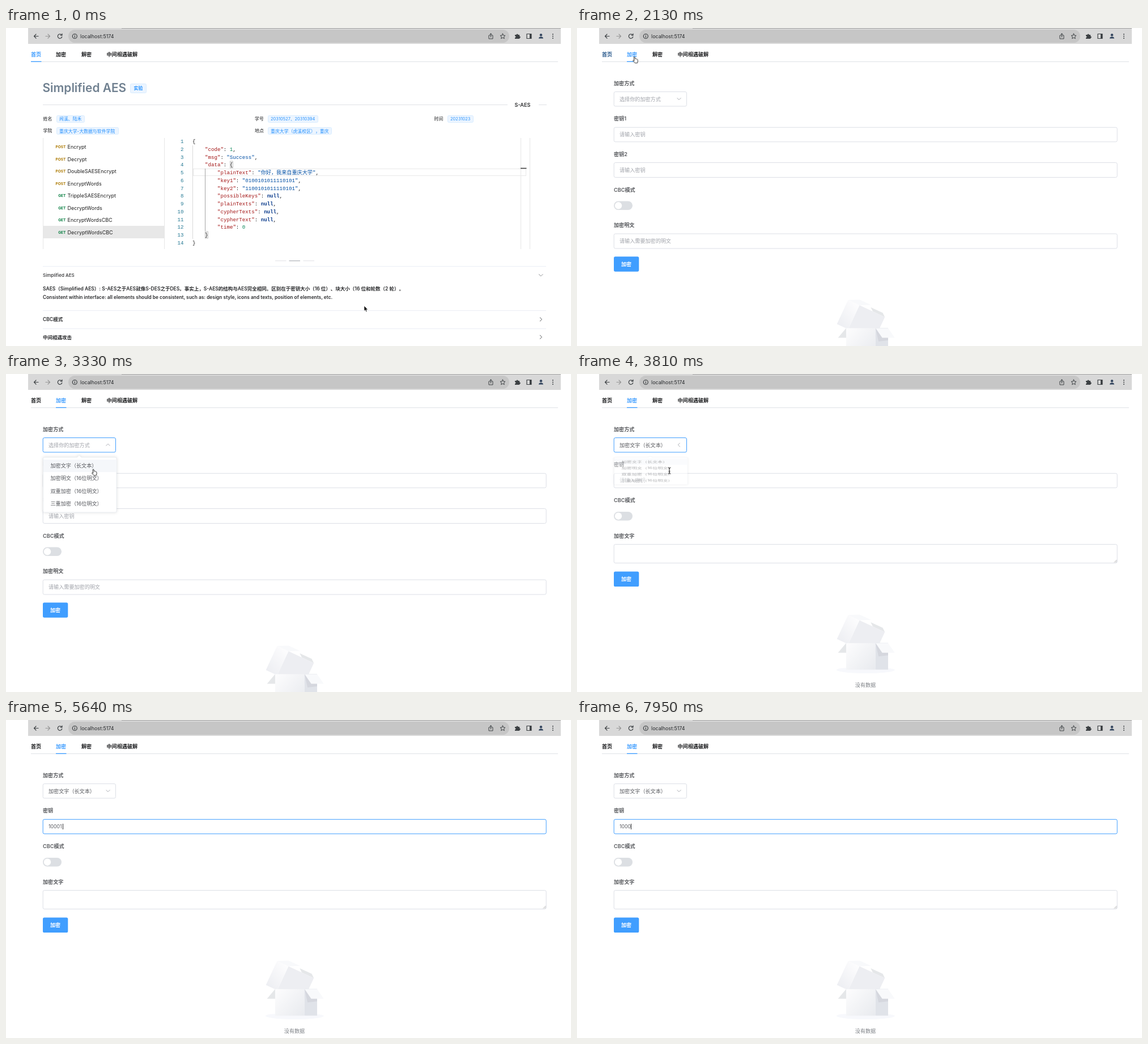
Recreate the animation shown at these times as an HTML page. Size 997 by 561 pixels, loop 8 s.

```html
<!DOCTYPE html>
<html lang="zh-CN">
<head>
<meta charset="utf-8">
<title>S-AES</title>
<style>
html, body { margin: 0; width: 100%; height: 100%; overflow: hidden; background: #fff; }
svg { display: block; width: 997px; height: 561px; text-spacing-trim: space-all; }
/* y of each text is the middle of its capitals */
text { font: 9.1px Inter, "Noto Sans CJK SC", "Noto Sans CJK", sans-serif; fill: #303133; transform: translateY(.36em); }
.nav text, .label, .mid, .bold { font-weight: 600; }
.nav text { fill: #1c1d1f; }
.label { fill: #56585c; }
.mid { font-size: 8.5px; fill: #2a2b2d; }
.small { font-size: 7.9px; fill: #1c1d1f; }
.tag { font-size: 7.9px; fill: #2390ff; }
.num { font-size: 7.5px; }
.tags rect { fill: #ecf5ff; stroke: #d9ecff; }
.api text { font-size: 9px; fill: #212121; }
.verb text { font-size: 6.6px; font-weight: 700; text-anchor: end; }
.post { fill: #ad7a03; }
.get { fill: #0a7f42; }
.code { font: 9.13px "Liberation Mono", "Noto Sans CJK SC", "Noto Sans CJK", monospace; transform: translateY(.33em); fill: #222; }
.key { fill: #a31515; }
.str { fill: #0451a5; }
.int { fill: #098658; }
.nul { fill: #0b3c8c; font-weight: 700; }
.hint { fill: #a0a3aa; }
.value { fill: #55575c; }
.digits { font-size: 8.7px; }
.field { fill: #fff; stroke: #dcdfe6; }
.thin { fill: none; stroke-linecap: round; stroke-linejoin: round; }

/* one loop lasts 8 s, 1% = 80 ms */
.step { animation: 8s step-end infinite; }
.flow { animation: 8s linear infinite; }
.home { animation-name: home; }
.form { animation-name: form; }
.first { animation-name: first; }
.second { animation-name: second; }
.nav .home-link { animation-name: home-link; }
.nav .form-link { animation-name: form-link; }
.menu { animation-name: menu; transform-origin: 129px 147px; }
.hover { animation-name: hover; }
.chevron { animation-name: chevron; transform-origin: 180px 125px; }
.select { animation-name: select; }
.input { animation-name: input; }
.ask { animation-name: ask; }
.one { animation-name: one; }
.four { animation-name: four; }
.five { animation-name: five; }
.caret { animation-name: caret; }
.cursor { animation-name: move; }
.arrow { animation-name: arrow; }
.hand { animation-name: hand; }
.beam { animation-name: beam; }

@keyframes home { 0% { opacity: 1 } 24.75%, to { opacity: 0 } }
@keyframes form { 0% { opacity: 0 } 24.75%, to { opacity: 1 } }
@keyframes first { 0% { opacity: 1 } 45.75%, to { opacity: 0 } }
@keyframes second { 0% { opacity: 0 } 45.75%, to { opacity: 1 } }
@keyframes home-link { 0%, 24.75% { fill: #409eff } 28.5%, to { fill: #1c1d1f } }
@keyframes form-link { 0%, 20.25% { fill: #1c1d1f } 23.5%, to { fill: #409eff } }
@keyframes menu {
  0%, 35.59% { opacity: 0; transform: scaleY(.43) }
  35.6% { opacity: .7; transform: scaleY(.43); animation-timing-function: ease-out }
  38.5%, 45.75% { opacity: 1; transform: none }
  49.5%, to { opacity: 0; transform: scaleY(0) }
}
@keyframes hover { 0% { opacity: 0 } 39.5%, to { opacity: 1 } }
@keyframes chevron {
  0%, 35.2% { transform: rotate(0) }
  38.8%, 45.75% { transform: rotate(180deg) }
  49.5%, to { transform: rotate(0) }
}
@keyframes select {
  0%, 35.59% { stroke: #dcdfe6 }
  35.6%, 51.25% { stroke: #409eff }
  57%, to { stroke: #dcdfe6 }
}
@keyframes input { 0%, 50.5% { stroke: #dcdfe6 } 53%, to { stroke: #409eff } }
@keyframes ask { 0% { opacity: 1 } 69.75%, to { opacity: 0 } }
@keyframes one { 0% { opacity: 0 } 69.75% { opacity: 1 } 70.125%, to { opacity: 0 } }
@keyframes four { 0% { opacity: 0 } 70.125% { opacity: 1 } 70.5% { opacity: 0 } 87.375%, to { opacity: 1 } }
@keyframes five { 0% { opacity: 0 } 70.5% { opacity: 1 } 87.375%, to { opacity: 0 } }
@keyframes caret {
  0% { opacity: 0; transform: none }
  50.5% { opacity: 1; transform: none }
  56.25% { opacity: 0; transform: none }
  67.8% { opacity: 1; transform: none }
  69.75% { opacity: 1; transform: translateX(4px) }
  70.125% { opacity: 1; transform: translateX(20px) }
  70.5% { opacity: 1; transform: translateX(25px) }
  76.1% { opacity: 0; transform: translateX(25px) }
  82.1% { opacity: 1; transform: translateX(25px) }
  87.375% { opacity: 1; transform: translateX(20px) }
  93.3% { opacity: 0; transform: translateX(20px) }
  99.3%, to { opacity: 1; transform: translateX(20px) }
}
@keyframes move {
  0%, 9.7% { transform: translate(632px, 490px) }
  10.5% { transform: translate(631.5px, 489.5px) }
  14.2% { transform: translate(631.5px, 489.5px); animation-timing-function: cubic-bezier(.35, .2, .4, 1) }
  19.1% { transform: translate(108px, 62px) }
  20.6% { transform: translate(100px, 52px) }
  23.6%, 25% { transform: translate(97px, 46px); animation-timing-function: ease-in-out }
  34.1%, 35.7% { transform: translate(147px, 116px); animation-timing-function: ease-in-out }
  41.2% { transform: translate(153px, 168px) }
  45.75% { transform: translate(154px, 166px); animation-timing-function: ease-in-out }
  52%, to { transform: translate(201.5px, 190px) }
}
@keyframes arrow { 0% { opacity: 1 } 20.3% { opacity: 0 } 28.2% { opacity: 1 } 33.3%, to { opacity: 0 } }
@keyframes hand { 0% { opacity: 0 } 20.3% { opacity: 1 } 28.2% { opacity: 0 } 33.3% { opacity: 1 } 47.6%, to { opacity: 0 } }
@keyframes beam { 0% { opacity: 0 } 47.6% { opacity: 1 } 69.75%, to { opacity: 0 } }
</style>
</head>
<body>
<svg viewBox="0 0 997 561" xmlns="http://www.w3.org/2000/svg">
<defs>
  <linearGradient id="lid" x1=".3885" y1="0" x2=".6115" y2="1">
    <stop stop-color="#fcfcfd"/><stop offset="1" stop-color="#eeeff3"/>
  </linearGradient>
  <linearGradient id="front" x1="0" y1=".095" x2="1" y2=".905">
    <stop stop-color="#fcfcfd"/><stop offset="1" stop-color="#e9ebef"/>
  </linearGradient>
  <filter id="shadow" x="-20%" y="-20%" width="140%" height="140%">
    <feDropShadow dx="0" dy="0" stdDeviation="2.5" flood-opacity=".14"/>
  </filter>
  <g id="toggle">
    <rect x="65" y="-7.7" width="33" height="15.4" rx="7.7" fill="#dcdfe3"/>
    <circle cx="73" r="6.2" fill="#fff"/>
  </g>
  <g id="button">
    <rect x="65" width="44.3" height="26.4" rx="2.6" fill="#409eff"/>
    <text class="bold" x="78" y="13" style="fill:#fff">加密</text>
  </g>
  <g id="empty">
    <g transform="scale(1.3)">
      <path d="M39.5 86C61.3 86 79 83.9 79 81.3S57.3 78 35.5 78 0 78.8 0 81.3 17.7 86 39.5 86Z" fill="#f7f8fc"/>
      <path d="M13 45H53L42 58H2Z" fill="#e5e7e9"/>
      <g transform="translate(34.5 31.5) scale(-1 1) rotate(-25) translate(-27.5 -21.5)">
        <path d="M0 7H18L23 3H5Z" fill="#e5e7e9"/>
        <path d="M0 7H38V43H0Z" fill="#edeef2"/>
        <rect x="38" y="7" width="17" height="36" fill="url(#lid)"/>
        <path d="M55 7H38L24 0H41Z" fill="#f8f9fb"/>
      </g>
      <rect x="13" y="45" width="40" height="36" fill="url(#front)"/>
      <path d="M53 45H70V81H53Z" fill="#e0e3e9"/>
      <path d="M70 45H53L57 63 70 61.5Z" fill="#d5d7de"/>
      <path d="M70 45H53L62 58H79Z" fill="#f8f9fb"/>
    </g>
    <text x="51" y="132" text-anchor="middle" style="fill:#7d8086">没有数据</text>
  </g>
</defs>

<!-- browser bar -->
<rect x="39" width="940" height="28" fill="#d8d8d8"/>
<rect x="204" width="775" height="1" fill="#a5a5a5"/>
<rect x="110" y="3" width="778" height="23" rx="11.5" fill="#c6c6c6"/>
<g class="thin" stroke="#3c4043" stroke-width="1.2">
  <path d="M57 14.5H49.5M53 11l-3.5 3.5L53 18"/>
  <path d="M70 14.5H77.5M74 11l3.5 3.5L74 18" stroke="#979797"/>
  <path d="M98.3 12.5A3.8 3.8 0 1 0 98.8 15.5M99 10v3h-3"/>
  <circle cx="121.3" cy="14.5" r="4"/>
  <path d="M121.3 14.2v2.3M121.3 12.3v.1"/>
  <path d="M854 13h-2v6h7v-6h-2M855.5 16v-6M853.7 11.5l1.8-1.8 1.8 1.8" stroke-width="1"/>
  <path d="M876.5 10l1.3 3 3.2.3-2.4 2.2.7 3.2-2.8-1.7-2.8 1.7.7-3.2-2.4-2.2 3.2-.3Z" stroke-width="1"/>
  <rect x="919" y="10.5" width="8" height="8"/>
</g>
<g fill="#3c4043">
  <path d="M898 12h2.5a1.6 1.6 0 0 1 3.2 0h2.5v2.5a1.6 1.6 0 0 1 0 3.2v1.3h-8.2v-2a1.5 1.5 0 0 0 0-3Z"/>
  <path d="M924 10.5h3v8h-3Z"/>
  <circle cx="965" cy="11" r="1"/><circle cx="965" cy="14.5" r="1"/><circle cx="965" cy="18" r="1"/>
</g>
<g fill="#34465f"><circle cx="944" cy="12.2" r="2.2"/><path d="M940 18.5v-1q1-2.3 4-2.3t4 2.3v1Z"/></g>
<text x="131" y="14.5" style="font-size:8.9px;fill:#26282b">localhost:5174</text>

<g class="nav">
  <path d="M44 59.5H974" stroke="#dfe1e6"/>
  <path class="home step" d="M44 59.3H62.5" stroke="#409eff" stroke-width="1.4"/>
  <path class="form step" d="M88 59.3H106.5" stroke="#409eff" stroke-width="1.4"/>
  <text class="home-link flow" x="44" y="47">首页</text>
  <text class="form-link flow" x="88" y="47">加密</text>
  <text x="133" y="47">解密</text>
  <text x="177.5" y="47">中间相遇破解</text>
</g>

<!-- home page -->
<g class="home step">
  <text class="bold" x="64.5" y="105.5" style="font-size:20.9px;fill:#708090">Simplified AES</text>
  <path d="M65 135.5H885M940 135.5H954" stroke="#dfe1e6"/>
  <text class="bold" x="897.5" y="136">S-AES</text>
  <g class="tags">
    <rect x="219.5" y="98.5" width="28" height="16" rx="2"/>
    <rect x="89.5" y="154.5" width="49" height="12" rx="2"/>
    <rect x="89.5" y="175.5" width="109" height="12" rx="2"/>
    <rect x="462.5" y="154.5" width="88" height="12" rx="2"/>
    <rect x="462.5" y="175.5" width="112" height="12" rx="2"/>
    <rect x="779.5" y="154.5" width="45" height="12" rx="2"/>
  </g>
  <text class="tag bold" x="225.5" y="106.5">实验</text>
  <text class="small" x="65.5" y="160">姓名</text>
  <text class="small" x="65.5" y="181.5">学院</text>
  <text class="small" x="439" y="160">学号</text>
  <text class="small" x="439" y="181.5">地点</text>
  <text class="small" x="755.5" y="160">时间</text>
  <text class="tag" x="94" y="160.5">闻溪、陆禾</text>
  <text class="tag" x="94" y="182">重庆大学-大数据与软件学院</text>
  <text class="tag num" x="467" y="160.5">20310527、20310394</text>
  <text class="tag" x="467" y="182">重庆大学（虎溪校区），重庆</text>
  <text class="tag num" x="784" y="160.5">20231023</text>

  <rect x="65" y="349" width="214" height="22" fill="#e8e8e8"/>
  <path d="M65.5 194V390M279.5 194V390M908.5 194V390M924.5 194V390" stroke="#e6e6e6"/>
  <g class="verb">
    <text class="post" x="105.5" y="210">POST</text>
    <text class="post" x="105.5" y="231.5">POST</text>
    <text class="post" x="105.5" y="253">POST</text>
    <text class="post" x="105.5" y="274.5">POST</text>
    <text class="get" x="105.5" y="296">GET</text>
    <text class="get" x="105.5" y="317.5">GET</text>
    <text class="get" x="105.5" y="339">GET</text>
    <text class="get" x="105.5" y="360.5">GET</text>
  </g>
  <g class="api">
    <text x="108.5" y="210">Encrypt</text>
    <text x="108.5" y="231.5">Decrypt</text>
    <text x="108.5" y="253">DoubleSAESEncrypt</text>
    <text x="108.5" y="274.5">EncryptWords</text>
    <text x="108.5" y="296">TrippleSAESEncrypt</text>
    <text x="108.5" y="317.5">DecryptWords</text>
    <text x="108.5" y="339">EncryptWordsCBC</text>
    <text x="108.5" y="360.5">DecryptWordsCBC</text>
  </g>

  <rect x="330.5" y="248.5" width="587" height="12" fill="none" stroke="#e8e8e8"/>
  <path d="M329.5 207V372" stroke="#d9d9d9"/>
  <path d="M351.5 248V358" stroke="#a5a5a5"/>
  <path d="M908 247.5H918.5" stroke="#3c3c3c" stroke-width="1.5"/>
  <g fill="#f1f1f1" stroke="#b9b9b9" stroke-width=".8">
    <rect x="395.3" y="235" width="5" height="12"/><rect x="351.3" y="359" width="5" height="12"/>
  </g>
  <text class="code" y="200" text-anchor="end" style="fill:#237893">
    <tspan x="313.5">1</tspan><tspan x="313.5" dy="13.77">2</tspan><tspan x="313.5" dy="13.77">3</tspan><tspan x="313.5" dy="13.77">4</tspan><tspan x="313.5" dy="13.77">5</tspan><tspan x="313.5" dy="13.77">6</tspan><tspan x="313.5" dy="13.77">7</tspan><tspan x="313.5" dy="13.77">8</tspan><tspan x="313.5" dy="13.77">9</tspan><tspan x="313.5" dy="13.77">10</tspan><tspan x="313.5" dy="13.77">11</tspan><tspan x="313.5" dy="13.77">12</tspan><tspan x="313.5" dy="13.77">13</tspan><tspan x="313.5" dy="13.77">14</tspan>
  </text>
  <text class="code" y="200">
    <tspan x="329">{</tspan>
    <tspan x="351" dy="13.77" class="key">"code"</tspan>: <tspan class="int">1</tspan>,
    <tspan x="351" dy="13.77" class="key">"msg"</tspan>: <tspan class="str">"Success"</tspan>,
    <tspan x="351" dy="13.77" class="key">"data"</tspan>: {
    <tspan x="373" dy="13.77" class="key">"plainText"</tspan>: <tspan class="str">"你好，我来自重庆大学"</tspan>,
    <tspan x="373" dy="13.77" class="key">"key1"</tspan>: <tspan class="str">"0100101011110101"</tspan>,
    <tspan x="373" dy="13.77" class="key">"key2"</tspan>: <tspan class="str">"1100101011110101"</tspan>,
    <tspan x="373" dy="13.77" class="key">"possibleKeys"</tspan>: <tspan class="nul">null</tspan>,
    <tspan x="373" dy="13.77" class="key">"plainTexts"</tspan>: <tspan class="nul">null</tspan>,
    <tspan x="373" dy="13.77" class="key">"cypherTexts"</tspan>: <tspan class="nul">null</tspan>,
    <tspan x="373" dy="13.77" class="key">"cypherText"</tspan>: <tspan class="nul">null</tspan>,
    <tspan x="373" dy="13.77" class="key">"time"</tspan>: <tspan class="int">0</tspan>
    <tspan x="351" dy="13.77">}</tspan>
    <tspan x="329" dy="13.77">}</tspan>
  </text>

  <path d="M475 410.7H494.5M524.5 410.7H544" stroke="#e6e7ea" stroke-width="1.3"/>
  <path d="M499.5 410.7H519" stroke="#b4b7bd" stroke-width="1.3"/>
  <path d="M65 420.5H953M65 498.5H953M65 530.5H953" stroke="#ebeef5"/>
  <path class="thin" d="M940.5 434.5l3.3 3.3 3.3-3.3" stroke="#8a8c90"/>
  <path class="thin" d="M942.3 510.8l3.3 3.2-3.3 3.2M942.3 542l3.3 3.2-3.3 3.2" stroke="#55575a"/>
  <text x="65" y="436" style="font-size:8px;font-weight:500">Simplified AES</text>
  <text class="mid" x="65" y="459.5">SAES（Simplified AES）: S-AES之于AES就像S-DES之于DES。事实上，S-AES的结构与AES完全相同。区别在于密钥大小（16 位）、块大小（16 位和轮数（2 轮）。</text>
  <text class="mid" x="65" y="474.5" style="font-size:8.4px">Consistent within interface: all elements should be consistent, such as: design style, icons and texts, position of elements, etc.</text>
  <text class="mid" x="65" y="514">CBC模式</text>
  <text class="mid" x="65" y="545.5">中间相遇攻击</text>
</g>

<!-- encryption form -->
<g class="form step">
  <text class="label" x="65" y="97.5">加密方式</text>
  <rect class="field select flow" x="65.2" y="112.5" width="128.3" height="25.5" rx="2.5"/>
  <path class="thin chevron flow" d="M176.8 123.5l3.2 3.2 3.2-3.2" stroke="#a8abb2"/>
  <rect class="field input flow" x="65.2" y="175.3" width="888" height="25.5" rx="2.5"/>
  <text class="hint ask step" x="75" y="188">请输入密钥</text>

  <g class="first step">
    <text class="hint" x="75" y="125.5">选择你的加密方式</text>
    <text class="label" x="65" y="160">密钥1</text>
    <text class="label" x="65" y="222.5">密钥2</text>
    <rect class="field" x="65.2" y="237.5" width="888" height="26" rx="2.5"/>
    <text class="hint" x="75" y="250.5">请输入密钥</text>
    <text class="label" x="65" y="285.5">CBC模式</text>
    <use href="#toggle" y="313.3"/>
    <text class="label" x="65" y="348">加密明文</text>
    <rect class="field" x="65.2" y="363" width="888" height="26" rx="2.5"/>
    <text class="hint" x="75" y="376">请输入需要加密的明文</text>
    <use href="#button" y="403.3"/>
    <use href="#empty" x="458" y="471"/>
  </g>

  <g class="second step">
    <text class="value" x="75" y="125.5">加密文字（长文本）</text>
    <text class="label" x="65" y="160">密钥</text>
    <text class="label" x="65" y="222.5">CBC模式</text>
    <use href="#toggle" y="250.7"/>
    <text class="label" x="65" y="285.5">加密文字</text>
    <rect class="field" x="65.2" y="300.5" width="888" height="33" rx="2.5"/>
    <path d="M948 332.5l4.5-4.5M950.5 332.5l2-2" stroke="#8f8f8f" stroke-width=".7"/>
    <use href="#button" y="348.6"/>
    <use href="#empty" x="458" y="416.3"/>
    <text class="value digits one step" x="75" y="188">1</text>
    <text class="value digits four step" x="75" y="188">1000</text>
    <text class="value digits five step" x="75" y="188">10001</text>
    <rect class="caret step" x="75" y="183" width="1" height="10" fill="#303133"/>
  </g>

  <g class="menu flow">
    <path d="M65.5 149a2 2 0 0 1 2-2H125.5l3.7-3.7 3.7 3.7H193a2 2 0 0 1 2 2V242a2 2 0 0 1-2 2H67.5a2 2 0 0 1-2-2Z" fill="#fff" stroke="#e4e7ed" stroke-width=".8" filter="url(#shadow)"/>
    <rect class="hover step" x="66" y="151" width="129" height="22" fill="#f5f7fa"/>
    <text class="value" x="78.5" y="162">加密文字（长文本）</text>
    <text class="value" x="78.5" y="184.2">加密明文（16位明文）</text>
    <text class="value" x="78.5" y="206.4">双重加密（16位明文）</text>
    <text class="value" x="78.5" y="228.6">三重加密（16位明文）</text>
  </g>
</g>

<g class="cursor flow">
  <path class="arrow step" d="M0 0V9.3L2.1 7.4 3.5 10.7 5.1 10 3.7 6.9H6.5Z" fill="#000" stroke="#fff" stroke-width=".7"/>
  <path class="hand step" d="M0 1.3a.9.9 0 0 1 1.8-.2L2.5 4l.2-.5q1-.4 1.4.5.9-.4 1.4.5 1-.1 1.2.9l.4 2.3-.9 3.4H2L-1.4 7.4q-.4-1.2 1-1l1.1.8Z" fill="#fff" stroke="#111" stroke-width=".9" stroke-linejoin="round"/>
  <path class="beam step thin" d="M-2-5.5Q0-5.5 0-4V4Q0 5.5-2 5.5M2-5.5Q0-5.5 0-4M0 4Q0 5.5 2 5.5M-1 1.2H1" stroke="#111"/>
</g>
</svg>
</body>
</html>
```
